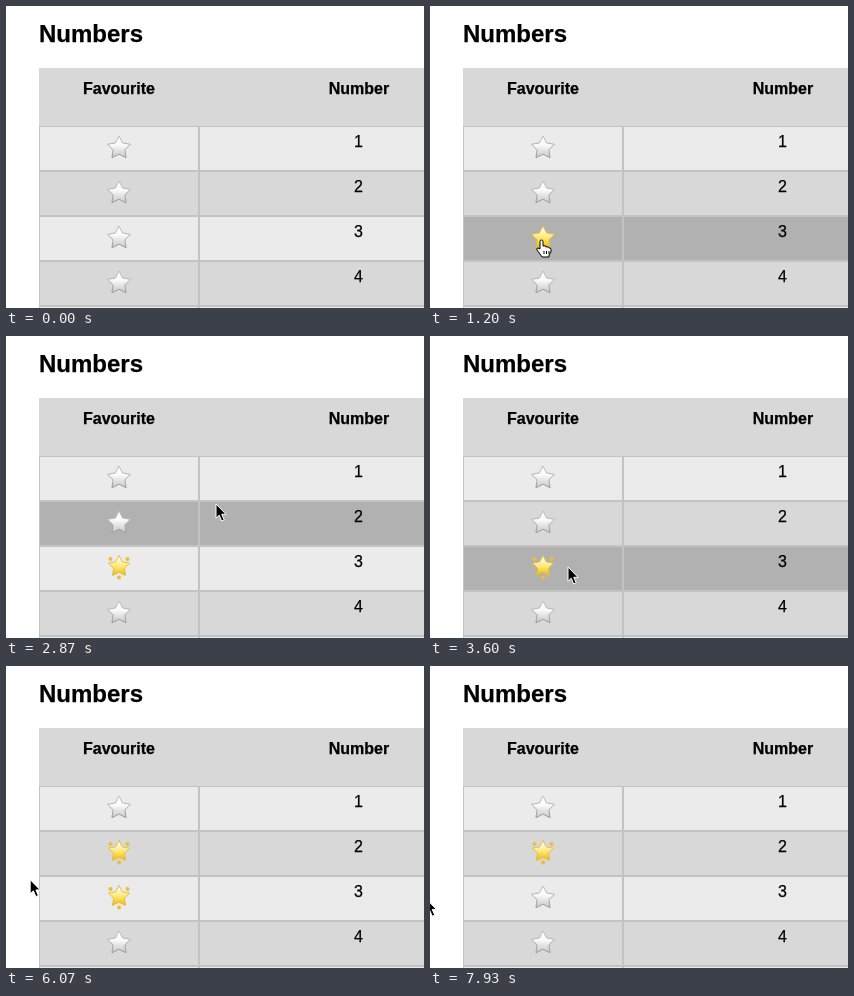
Animation of 418 by 302 pixels, one loop 8000 ms. Source, as an HTML page:

```html
<!DOCTYPE html>
<html>
<head>
<meta charset="utf-8">
<title>Numbers</title>
<style>
html, body { margin: 0; width: 100%; height: 100%; overflow: hidden; background: #fff; }
svg { display: block; font: 16px "Liberation Sans", Arial, sans-serif; }
text { stroke: #000; stroke-width: .25; }
.b { font-weight: bold; }
.mid { text-anchor: middle; }
</style>
</head>
<body>
<svg width="418" height="302" viewBox="0 0 418 302">
  <defs>
    <linearGradient id="silver" x2="0" y2="1">
      <stop offset=".4" stop-color="#fbfbfb"/><stop offset="1" stop-color="#c6c6c6"/>
    </linearGradient>
    <linearGradient id="rim" x2="0" y2="1">
      <stop offset=".1" stop-color="#bdbdbd"/><stop offset="1" stop-color="#999"/>
    </linearGradient>
    <linearGradient id="gold" x2="0" y2="1">
      <stop offset=".2" stop-color="#fffbd8"/><stop offset=".6" stop-color="#fbe468"/><stop offset="1" stop-color="#efb900"/>
    </linearGradient>
    <path id="star" stroke-linejoin="round"/>
    <circle id="spark" r="2" fill="#ecbd3c"/>
    <g id="plain"><use href="#star" fill="url(#silver)" stroke="url(#rim)"/></g>
    <g id="lit"><use href="#star" fill="url(#gold)" stroke="#e6bd3c"/></g>
    <g id="glow">
      <use href="#spark" x="-8.5" y="-9"/><use href="#spark" x="8.5" y="-9"/><use href="#spark" y="9.5"/>
      <use href="#star" transform="translate(0 -1.5) scale(.92)" fill="url(#gold)" stroke="#e6b93a"/>
    </g>
    <path id="arrow" d="M0 0V14.2L3.2 11.2 5.7 17 8.2 15.9 5.7 10.3H10Z" stroke="#fff"/>
    <path id="hand" d="M-2 9V1.500a1.500 1.500 0 0 1 3 0V6q3-1 3 1 3-1 3 1 2-.5 2 1.500V12l-2 3v2H0L-2 14-5 10q-1-2 1-2z M2 11v3M4.500 11v3M7 11v3" fill="#fff" stroke="#000" stroke-linejoin="round"/>
  </defs>
  <text class="b" x="33" y="36" font-size="24">Numbers</text>
  <rect x="33" y="62" width="385" height="240" fill="#c3c3c3"/>
  <rect id="head" x="33" y="62" width="385" height="58"/>
  <text class="b mid" x="113" y="88">Favourite</text>
  <text class="b mid" x="353" y="88">Number</text>
  <g id="rows"></g>
  <use id="cursor"/>
</svg>
<script>
const LOOP = 8000, STEP = 1000 / 15, STAR_X = 113;
const $ = id => document.getElementById(id);
const rowTop = i => 121 + 45 * i;
const rowAt = y => Math.floor((y - 120) / 45);
const starY = i => rowTop(i) + 21;
const clamp = v => Math.max(0, Math.min(1, v));

// Turning points of the pointer: time, x, y
const route = [
  [267, 440, 70], [933, 112, 234], [1800, 112, 234], [2467, 210, 168],
  [3000, 210, 168], [3600, 138, 231], [4330, 108, 194], [5000, 108, 194],
  [5500, -10, 184], [5733, -12, 184], [6600, 82, 261], [6733, 90, 247],
  [7000, 112, 234], [7467, 112, 234], [8000, -20, 233]
];
// Clicks: time, row, favourite afterwards
const clicks = [[1070, 2, true], [4655, 1, true], [7000, 2, false]];

const tips = [...Array(10)].map((_, k) => {
  const r = k % 2 ? 6.2 : 12, a = k * Math.PI / 5;
  return [r * Math.sin(a), -r * Math.cos(a)].map(v => v.toFixed(2));
});
$("star").setAttribute("d", "M" + tips.join("L") + "Z");

let html = "";
for (let i = 0; i < 5; i++) {
  html += `<g class="row"><path d="M34 ${rowTop(i)}H192v43H34zM194 ${rowTop(i)}H418v43H194z"/>
    <use class="icon"/><text class="mid" x="352.5" y="${rowTop(i) + 20}">${i + 1}</text></g>`;
}
$("rows").innerHTML = html;
const rows = [...document.querySelectorAll(".row")];

function pointer(t) {
  const n = Math.max(1, route.findIndex(p => p[0] >= t));
  const [t0, x0, y0] = route[n - 1], [t1, x1, y1] = route[n];
  const u = clamp((t - t0) / (t1 - t0));
  return [x0 + (x1 - x0) * u, y0 + (y1 - y0) * u];
}

// Row under the pointer; -1 is the header
function hovered([x, y]) {
  return x < 33 || x > 418 || y < 62 ? null : Math.max(-1, rowAt(y));
}

function iconState(i, t) {
  let kind = "plain", scale = 1;
  for (const [at, row, on] of clicks) {
    if (row !== i || t < at) continue;
    kind = !on ? "plain" : t < at + 140 ? "lit" : "glow";
    scale = 1 + 1.6 * Math.sin(Math.PI * clamp((t - at - 140) / 320));
  }
  return [kind, scale];
}

function draw(now) {
  const t = Math.floor((now % LOOP) / STEP + .06) * STEP;
  const [x, y] = pointer(t), over = rowAt(y);
  const hot = hovered(pointer(t - STEP)); // highlight trails by one step
  $("head").setAttribute("fill", hot === -1 ? "#b1b1b1" : "#d8d8d8");
  rows.forEach((row, i) => {
    const [kind, scale] = iconState(i, t), icon = row.querySelector(".icon");
    row.firstChild.setAttribute("fill", hot === i ? "#b1b1b1" : i % 2 ? "#d8d8d8" : "#ebebeb");
    icon.setAttribute("href", "#" + kind);
    icon.setAttribute("transform", `translate(${STAR_X} ${starY(i) - 3}) scale(${scale}) translate(0 3)`);
  });
  const onStar = Math.abs(x - STAR_X) < 12 && Math.abs(y - starY(over)) < 13;
  $("cursor").setAttribute("href", onStar ? "#hand" : "#arrow");
  $("cursor").setAttribute("transform", `translate(${x} ${y})`);
}

const start = performance.now();
function tick() {
  draw(performance.now() - start);
  requestAnimationFrame(tick);
}
tick();
</script>
</body>
</html>
```
